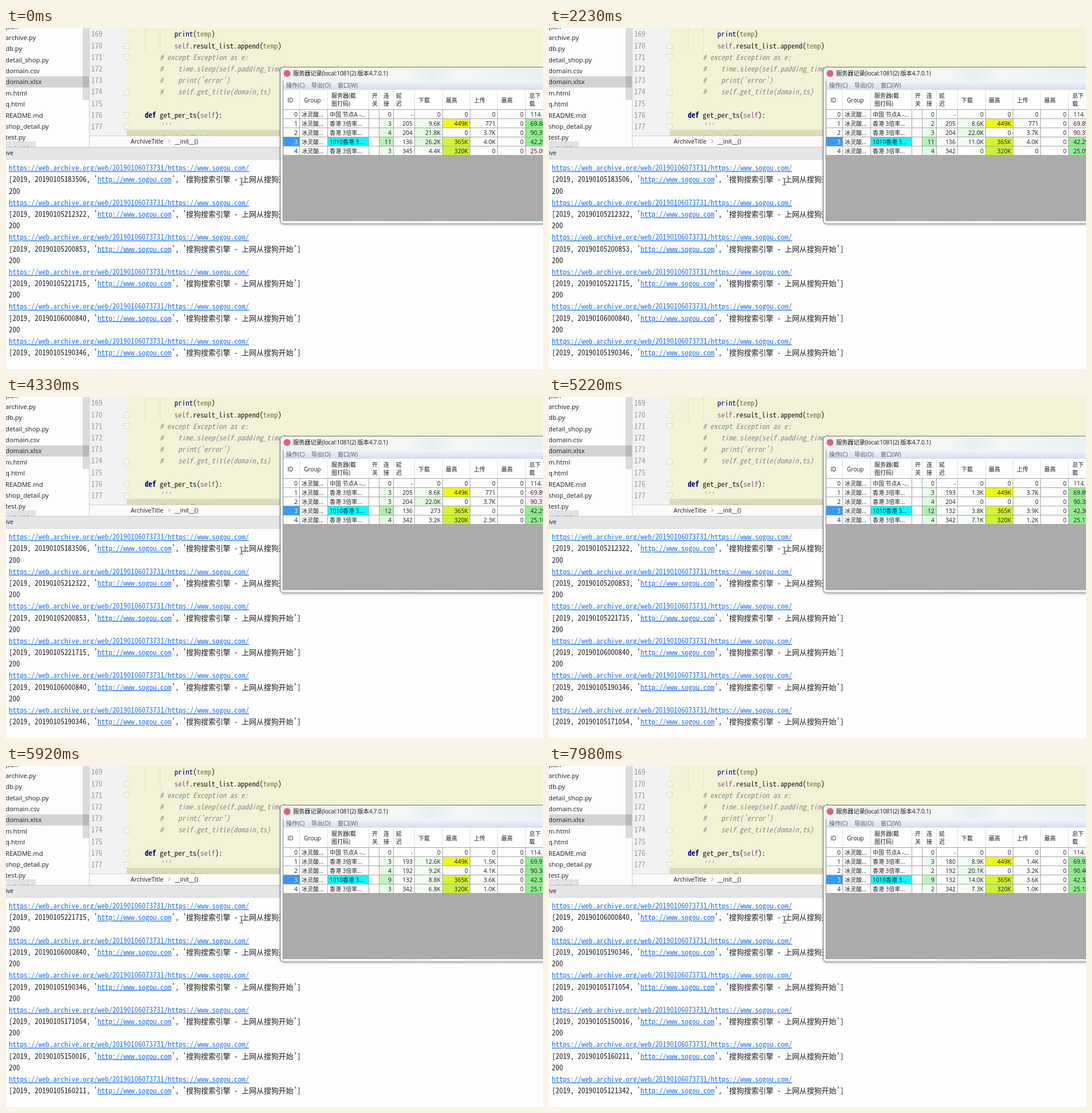
These frames come from a looping animation (939 px wide and 596 px high, 8000 ms). An HTML page:

```html
<!DOCTYPE html>
<html lang="zh-CN">
<head>
<meta charset="utf-8">
<style>
html, body { margin: 0; width: 100%; height: 100%; overflow: hidden; background: #fff; }
svg { display: block; width: 100%; height: 100%; }
text { white-space: pre; fill: #1c1c1c; }
.mono { font: 12.93px "Noto Sans Mono CJK SC", "Liberation Mono", monospace; font-size-adjust: ch-width .5; }
.wide { font: 12.93px "Noto Sans CJK SC", "Noto Sans CJK", sans-serif; }
.ui { font: 10px "Open Sans", "Noto Sans CJK SC", "Noto Sans CJK", sans-serif; }
.tree { font: 11.3px "Open Sans", sans-serif; }
.crumb { font: 10.6px "Open Sans", sans-serif; }
.link { fill: #1f70f5; text-decoration: underline; }
.num { fill: #999; }
.note { fill: #8a8a8a; font-style: italic; }
.key { fill: #000080; }
.self { fill: #94558d; }
.arg { fill: #7a7a35; }
.bold { font-weight: bold; }
.dim { fill: #555b66; }
</style>
</head>
<body>
<svg id="stage" viewBox="0 0 939 596">
  <defs>
    <linearGradient id="glass" x2="1" y2=".08">
      <stop offset="0" stop-color="#f3f6f7"/><stop offset=".45" stop-color="#fbfdfd"/>
      <stop offset=".55" stop-color="#eaf4f8"/><stop offset=".65" stop-color="#fafdfe"/>
      <stop offset="1" stop-color="#eaf4f8"/>
    </linearGradient>
    <linearGradient id="menu" x2="0" y2="1">
      <stop offset="0" stop-color="#f2f5fa"/><stop offset="1" stop-color="#d7deea"/>
    </linearGradient>
    <filter id="soft" x="-10%" y="-10%" width="120%" height="120%"><feGaussianBlur stdDeviation="2"/></filter>
  </defs>
  <g id="editor"></g>
  <g id="log"></g>
  <g id="frame"></g>
  <g id="table"></g>
</svg>
<script>
const LOOP = 8000, CW = 6.465, PITCH = 20.19;
const put = (id, html) => document.getElementById(id).innerHTML = html;
const rect = (x, y, w, h, fill, more = '') =>
  `<rect x="${x}" y="${y}" width="${w}" height="${h}" fill="${fill}" ${more}/>`;
const text = (x, y, s, cls, more = '') => `<text x="${x}" y="${y}" class="${cls}" ${more}>${s}</text>`;
const line = (x1, y1, x2, y2, color) =>
  `<path d="M${x1} ${y1}L${x2} ${y2}" stroke="${color}" fill="none"/>`;
const span = (cls, s) => `<tspan class="${cls}">${s}</tspan>`;

function editor() {
  const files = ['json', 'archive.py', 'db.py', 'detail_shop.py', 'domain.csv', 'domain.xlsx', 'm.html',
    'q.html', 'README.md', 'shop_detail.py', 'test.py', 'web_title.py'];
  const self = span('self', 'self');
  const code = [
    [12, span('key', 'print') + `(${span('arg', 'temp')})`],
    [12, `${self}.result_list.append(${span('arg', 'temp')})`],
    [8, span('note', '# except Exception as e:')],
    [8, span('note', '#    time.sleep(self.padding_time)')],
    [8, span('note', "#    print('error')")],
    [8, span('note', '#    self.get_title(domain,ts)')],
    [0, ''],
    [4, span('key bold', 'def') + ` get_per_ts(${self}):`],
    [8, span('note', "'''")],
  ];
  const folds = [[31, -1], [51, 1], [112, -1], [153, 1], [173, 1]];
  let s = rect(0, 0, 145, 208, '#fdfdfd') + rect(0, 84.5, 145, 19.5, '#d4d4d4') +
    rect(134, 0, 11, 126, '#000', 'opacity=".13"') + rect(0, 198, 52, 10, '#e2e2e2');
  files.forEach((f, i) => s += text(-1, 1.6 + 19.37 * i, f, 'tree'));
  s += rect(145, 0, 66, 188, '#f2f2f2') + line(145.5, 0, 145.5, 208, '#d0d0d0') +
    rect(211, 0, 728, 188, '#f2f3d5') + rect(211, 178, 728, 10, '#dadbb9') +
    line(243.5, 0, 243.5, 41, '#e0e1c6') + line(269.5, 0, 269.5, 41, '#e0e1c6');
  code.forEach(([indent, c], i) => {
    const y = 15.3 + 20.2 * i;
    s += text(149, y, 169 + i, 'mono num') + text(217 + indent * CW, y, c, 'mono');
  });
  s += text(269, 198, '获取每年最大数目', 'wide', 'style="fill:#808080"');
  for (const [y, d] of folds)
    s += `<path transform="translate(210.5 ${y}) scale(1 ${d})" d="M-5-5H5V1L0 5-5 1ZM-2-1H2" fill="#fafaf0" stroke="#d2d2c4"/>`;
  return s + rect(146, 188, 793, 20, '#fafafa') + line(146, 188.5, 939, 188.5, '#d2d2d2') +
    text(218, 202, 'ArchiveTitle', 'crumb') +
    '<path d="M284 195l3 3-3 3" fill="none" stroke="#888"/>' +
    text(295, 202, '__init__()', 'crumb') +
    rect(0, 208, 939, 21, '#e4e6e8') + line(0, 208.5, 939, 208.5, '#c4c4c4') +
    line(0, 229.5, 939, 229.5, '#d2d2d2') + text(-1, 222, 'ive', 'crumb') +
    rect(0, 230, 939, 366, '#fefefe');
}

const STAMPS = ['05183506', '05212322', '05200853', '05221715', '06000840',
  '05190346', '05171054', '05150016', '05160211', '05121342'];

function log(first) {
  let s = '';
  for (let i = 0; i < 6; i++) {
    const y = 249.2 + PITCH * 3 * i, y2 = y + PITCH;
    s += text(5, y, 'https://web.archive.org/web/20190106073731/https://www.sogou.com/', 'mono link') +
      text(5, y2, `[2019, 201901${STAMPS[first + i]}, '`, 'mono') +
      text(160, y2, 'http://www.sogou.com', 'mono link') +
      text(289.5, y2, "', '", 'mono') + text(315, y2, '搜狗搜索引擎', 'wide') +
      text(399, y2, '-', 'mono') + text(412, y2, '上网从搜狗开始', 'wide') +
      text(502.5, y2, "']", 'mono');
    if (i < 5) s += text(5, y2 + PITCH, '200', 'mono');
  }
  return s + '<path d="M408.5 262.5h2l1 1 1-1h2M411.5 263v11M408.5 274.5h2l1-1 1 1h2" fill="none" stroke="#222"/>';
}

const EDGES = [485, 514, 563, 635, 653, 678, 715, 764, 812, 860, 909, 945];

function frame() {
  const heads = [[492, 'ID'], [521, 'Group'], [569, '服务器(截', '图打码)'], [640, '开', '关'], [660, '连', '接'],
    [682, '延', '迟'], [721, '下载'], [769, '最高'], [818, '上传'], [866, '最高'], [915, '总下', '载']];
  let s = rect(479, 70, 480, 274, '#000', 'rx="7" opacity=".28" filter="url(#soft)"') +
    rect(479.5, 68.5, 480, 273.5, 'url(#glass)', 'rx="6" fill-opacity=".92" stroke="#6a6e72"') +
    rect(480.5, 69.5, 480, 271.5, 'none', 'rx="5" stroke="#fff" stroke-opacity=".8"') +
    '<circle cx="491.5" cy="79.5" r="6" fill="#df5f7d"/>' +
    text(502, 83, '服务器记录(local:1081(2) 版本4.7.0.1)', 'ui', 'style="font-size:10.3px;letter-spacing:-.25px"') +
    rect(485, 92, 454, 244, '#ababab') + rect(485, 92, 454, 16, 'url(#menu)') +
    text(490, 103.5, '操作(C)', 'ui dim') + text(534, 103.5, '导出(O)', 'ui dim') +
    text(580, 103.5, '窗口(W)', 'ui dim') +
    rect(485, 108, 454, 34, '#fff') + line(484.5, 92, 484.5, 336, '#8b9096') + line(484, 336.5, 939, 336.5, '#8b9096');
  for (const x of EDGES.slice(1)) s += line(x - .5, 109, x - .5, 142, '#e3e3e3');
  for (const [x, a, b] of heads)
    s += b ? text(x, 122, a, 'ui') + text(x, 135.5, b, 'ui') : text(x, 129.5, a, 'ui');
  return s;
}

const SERVERS = ['中国 节点A -...', '香港 3倍率...', '香港 3倍率...', '1010香港 3...', '香港 3倍率...'];
const PEAKS = ['0', '449K', '0', '365K', '320K'];
const PEAK_FILL = ['#fff', '#f0fa0c', '#fff', '#d6f52c', '#cbf236'];

// n: links, ms: delay, sum: total, fresh: total recently grew
const START = [
  { n: 0, ms: '-', down: '0', up: '0', sum: '114.17' },
  { n: 3, ms: 205, down: '9.6K', up: '771', sum: '69.88', fresh: 1 },
  { n: 4, ms: 204, down: '21.8K', up: '3.7K', sum: '90.37', fresh: 1 },
  { n: 11, ms: 136, down: '26.2K', up: '4.0K', sum: '42.29', fresh: 1 },
  { n: 3, ms: 345, down: '4.4K', up: '0', sum: '25.09' },
];
// time: changes by row
const EVENTS = [
  [280, { 1: { n: 2, down: '8.6K', sum: '69.89' }, 2: { n: 3, down: '22.0K' } }],
  [990, { 3: { fresh: 0 } }],
  [1860, { 3: { down: '11.0K', fresh: 1 } }],
  [1980, { 4: { n: 4, fresh: 1 } }],
  [2230, { 1: { fresh: 0 }, 2: { fresh: 0 }, 4: { ms: 342, down: '0' } }],
  [2820, { 4: { down: '1.2K' } }],
  [3370, { 4: { down: '3.2K' } }],
  [3900, { 3: { up: '0', fresh: 0 } }],
  [4330, { 1: { n: 3 }, 2: { n: 3 }, 3: { n: 12, down: '273', fresh: 1 }, 4: { up: '2.3K', sum: '25.10' } }],
  [4610, { 1: { ms: 193, down: '1.1K', up: '3.6K', fresh: 1 }, 2: { n: 4, down: '0', up: '0', sum: '90.38', fresh: 1 },
    3: { ms: 132, down: '1.9K', up: '2.1K', sum: '42.30' }, 4: { down: '5.3K', up: '1.2K' } }],
  [4920, { 1: { down: '1.3K', up: '3.7K' }, 3: { down: '3.8K', up: '3.9K' }, 4: { down: '7.1K', sum: '25.11' } }],
  [5340, { 2: { ms: 192, down: '2.4K', up: '4.1K' }, 3: { n: 10, down: '6.1K', sum: '42.31' } }],
  [5640, { 1: { down: '4.2K' }, 3: { down: '7.4K' } }],
  [5770, { 2: { down: '5.8K' }, 4: { up: '1.0K' } }],
  [5920, { 1: { down: '12.6K', up: '1.5K', sum: '69.91' }, 2: { down: '9.2K' },
    3: { n: 9, down: '8.8K', up: '3.6K', sum: '42.32' }, 4: { n: 3, down: '6.8K' } }],
  [6200, { 1: { down: '12.2K' }, 2: { down: '10.4K' } }],
  [6470, { 1: { n: 4, down: '11.7K', sum: '69.92' }, 2: { n: 3, down: '14.3K', up: '3.6K', sum: '90.39' },
    3: { down: '12.3K' }, 4: { n: 2, down: '7.3K', sum: '25.12' } }],
  [6620, { 1: { ms: 180, down: '10.1K' }, 2: { down: '17.2K', sum: '90.40' }, 3: { down: '14.0K' } }],
  [6900, { 1: { n: 3, down: '9.4K' }, 2: { n: 2, down: '20.1K', up: '3.2K' } }],
  [7170, { 1: { down: '9.2K' } }],
  [7730, { 1: { down: '8.5K', up: '1.3K' } }],
  [7980, { 1: { down: '8.9K', up: '1.4K' } }],
];
const SCROLLS = [4610, 5340, 5770, 6200];

const green = (v, k) => `rgb(${255 - k * v},${255 - v * k / 6},${255 - k * v})`;
const speed = s => s.endsWith('K') ? parseFloat(s) : 0;

function table(rows) {
  let s = rect(485, 142, 454, 80.5, '#fff');
  rows.forEach((r, i) => {
    const top = 142.5 + 16 * i, y = top + 12;
    const fill = (col, color) => s += rect(EDGES[col], top, EDGES[col + 1] - EDGES[col], 16, color);
    const right = (col, v, more = '') =>
      s += text(EDGES[col + 1] - 4, y, v, 'ui', `text-anchor="end" style="font-size:10.4px;${more}"`);
    if (i === 3) { fill(0, '#3399ff'); fill(2, '#00ffff'); }
    fill(4, green(r.n, 7));
    fill(6, green(speed(r.down), 1.3));
    fill(7, PEAK_FILL[i]);
    if (i) fill(10, r.fresh ? '#90ee90' : '#fff0f0');
    right(0, i, i === 3 ? 'fill:#fff' : '');
    s += text(517, y, '冰灵酸...', 'ui') + text(566, y, SERVERS[i], 'ui');
    right(4, r.n); right(5, r.ms); right(6, r.down);
    right(7, PEAKS[i]); right(8, r.up); right(9, '0');
    s += text(917, y, r.sum + 'G', 'ui', 'style="font-size:10.4px"');
  });
  for (let i = 0; i < 6; i++) s += line(485, 142.5 + 16 * i, 939, 142.5 + 16 * i, '#a5a5a5');
  for (const x of EDGES.slice(1, -1)) s += line(x - .5, 142, x - .5, 222.5, '#a5a5a5');
  return s;
}

put('editor', editor());
put('frame', frame());

let shown = -1, scrolled = -1;
function draw(now) {
  const t = now % LOOP;
  const past = EVENTS.filter(e => e[0] <= t), first = SCROLLS.filter(x => x <= t).length;
  if (past.length !== shown) {
    shown = past.length;
    put('table', table(START.map((row, i) => Object.assign({}, row, ...past.map(e => e[1][i])))));
  }
  if (first !== scrolled) put('log', log(scrolled = first));
  requestAnimationFrame(draw);
}
draw(0);
</script>
</body>
</html>
```
